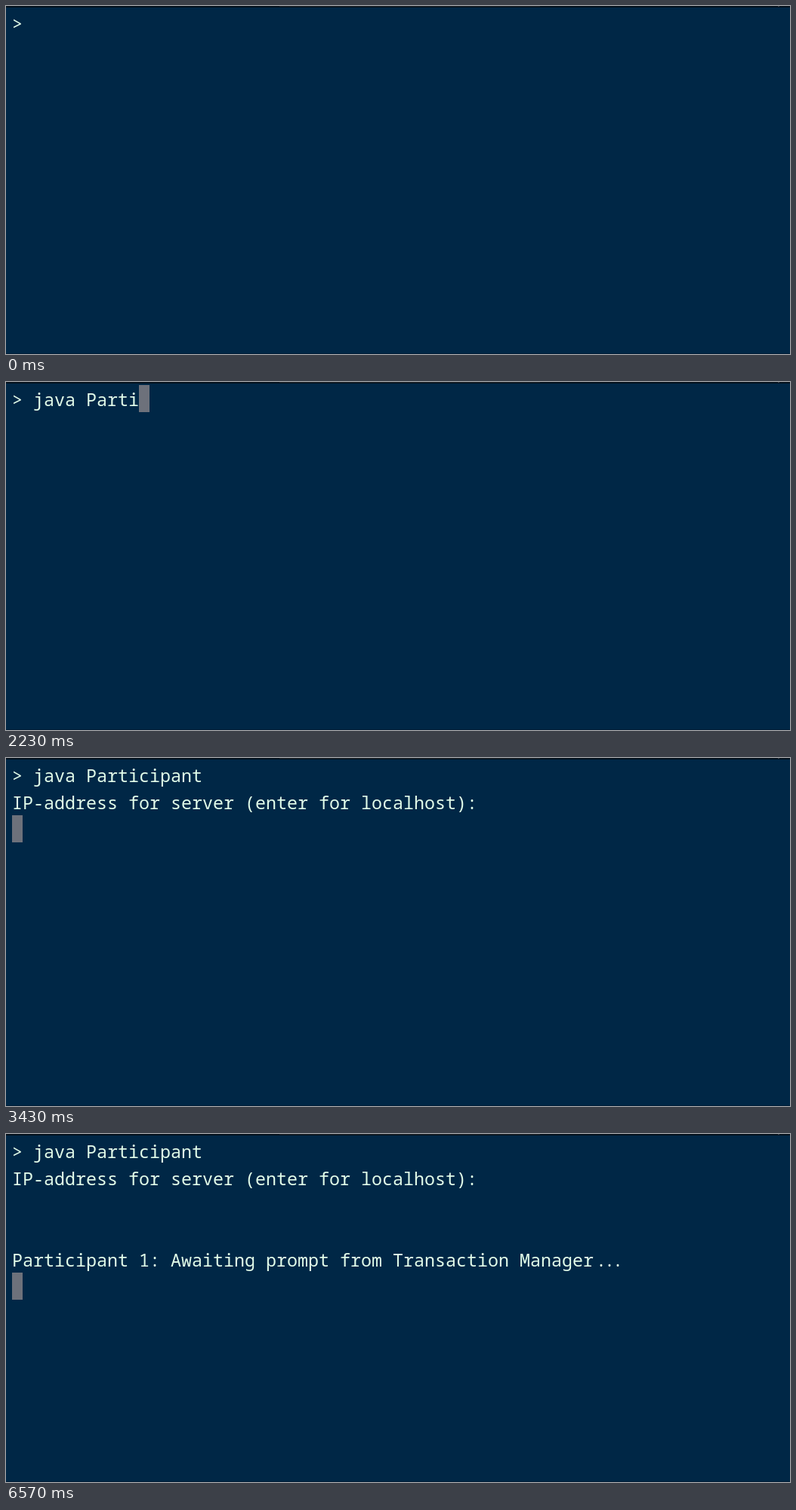
Recreate the animation shown at these times as an HTML page with a canvas. Size 1038 by 462 pixels, loop 6.61 s.

```html
<!DOCTYPE html>
<html lang="en">
<head>
<meta charset="utf-8">
<title>Terminal session</title>
<style>
  html, body { margin: 0; width: 100%; height: 100%; overflow: hidden; background: #002746; }
  canvas { display: block; }
</style>
</head>
<body>
<canvas id="stage" width="1038" height="462"></canvas>
<script>
const ctx = document.getElementById("stage").getContext("2d");
const LOOP = 6610;
const CELL = 14, ROW = 36, LEFT = 8, TOP = 4, BASELINE = 28;
const COMMAND = "java Participant";
const QUESTION = "IP-address for server (enter for localhost):";
const STATUS = "Participant 1: Awaiting prompt from Transaction Manager";

// Time at which each character of the command is typed
const KEYS = [970, 1100, 1200, 1300, 1400, 1630, 1730, 2000, 2100, 2200, 2300, 2400,
  2600, 2700, 2800, 2930];
const ENTER = 3130, ASK = 3300, REPLY = 3870, AWAIT = 3970;

// Intervals during which the cursor is hidden
const HIDDEN = [[0, 230], [750, 970], [4730, 5230], [5730, 6230]];

function rect(color, x, y, w, h) {
  ctx.fillStyle = color;
  ctx.fillRect(x, y, w, h);
}

function glyph(ch, col, row, shift = 0) {
  ctx.fillText(ch, LEFT + (col + 0.5) * CELL + shift, TOP + row * ROW + BASELINE);
}

function write(text, col, row) {
  [...text].forEach((ch, i) => glyph(ch, col + i, row));
}

// Three dots set closer together, like a coding-font ligature
function ellipsis(col, row) {
  for (let i = 0; i < 3; i++) glyph(".", col + i, row, (1 - i) * 3);
}

function cursorCell(t, typed) {
  if (t < ENTER) return [2 + typed, 0];
  if (t < ASK) return [0, 1];
  if (t < REPLY) return [0, 2];
  if (t < AWAIT) return [0, 3];
  return [0, 5];
}

function drawWindow() {
  rect("#002746", 0, 0, 1038, 462);
  rect("#04111d", 0, 0, 1038, 2);
  rect("#1b2229", 362, 0, 345, 1);
  rect("#39414a", 1022, 0, 2, 1);
  rect("#001d36", 0, 461, 1038, 1);
}

function draw(t) {
  drawWindow();
  const typed = KEYS.filter(k => k <= t).length;

  if (!HIDDEN.some(([a, b]) => t >= a && t < b)) {
    const [col, row] = cursorCell(t, typed);
    rect("#6d717b", LEFT + col * CELL, TOP + row * ROW, CELL, ROW);
  }

  ctx.font = "500 23.33px 'Fira Code', 'Fira Mono', 'Noto Sans Mono', 'DejaVu Sans Mono', monospace";
  ctx.textAlign = "center";
  ctx.fillStyle = "#e1fbe9";
  write(">", 0, 0);
  write(COMMAND.slice(0, typed), 2, 0);
  if (t >= ASK) write(QUESTION, 0, 1);
  if (t >= AWAIT) {
    write(STATUS, 0, 4);
    ellipsis(STATUS.length, 4);
  }
}

const start = performance.now();
function tick() {
  draw((performance.now() - start) % LOOP);
  requestAnimationFrame(tick);
}
tick();
</script>
</body>
</html>
```
